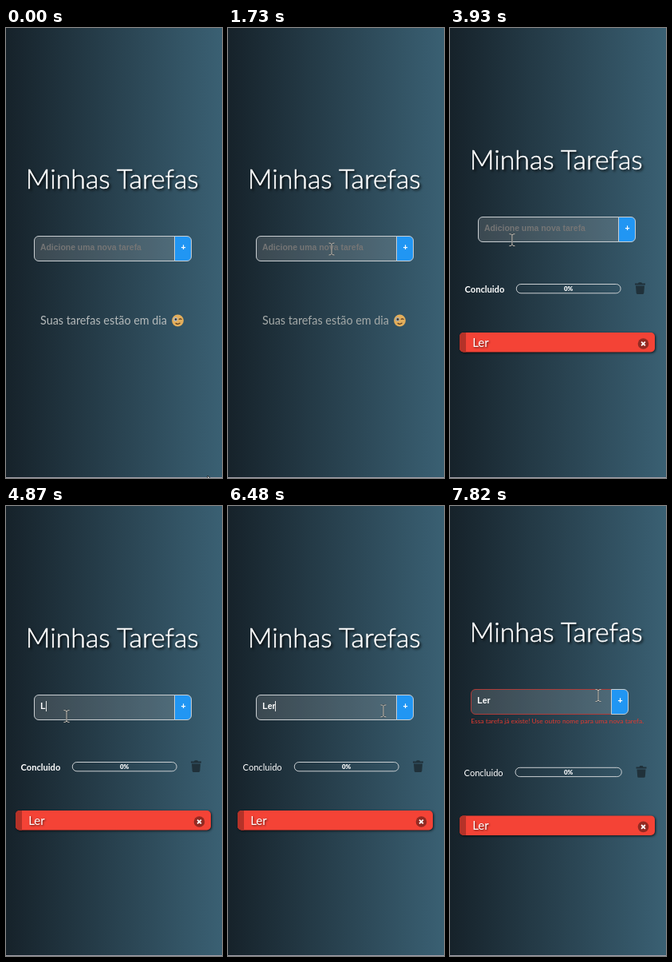
Recreate the animation shown at these times as an HTML page. Size 271x563 px, loop 8000 ms.

```html
<!DOCTYPE html>
<html lang="pt-BR">
<head>
<meta charset="utf-8">
<title>Minhas Tarefas</title>
<style>
  html, body { margin: 0; width: 100%; height: 100%; overflow: hidden; }
  body { background: linear-gradient(to right, #16222a, #3a6073); }
  svg { display: block; width: 271px; height: 563px; font-family: Lato, sans-serif; fill: #fff; }
  .mid { text-anchor: middle; }
  .line { fill: none; stroke: #c9ced1; }
  #title { font-size: 33.9px; font-weight: 300; stroke: #fff; stroke-width: .5px; filter: drop-shadow(2px 2px 1.5px rgba(0, 0, 0, .75)); }
  #empty text { font-size: 14.35px; }
  #field text { font: bold 10.45px "Liberation Sans", Arial, sans-serif; }
  #field #error { font: 8.4px Lato, sans-serif; fill: #e0392f; }
  #hint { fill: #757575; }
  #done { font-size: 11.1px; }
  #pct { font-size: 8px; font-weight: 900; }
  #bar { filter: drop-shadow(1px 1px 1.5px rgba(0, 0, 0, .75)); }
  #name { font-size: 15px; filter: drop-shadow(1px 1px 1px rgba(0, 0, 0, .6)); }
  .popup { font: 12.8px "Open Sans", "Noto Sans", sans-serif; }
  .panel { fill: #2b2b2b; filter: drop-shadow(0 3px 4px rgba(0, 0, 0, .4)); }
  #beam path { fill: none; }
</style>
</head>
<body>
<svg viewBox="0 0 271 563">
  <rect y="562" width="271" height="1" fill="#a39fa9"/>

  <text id="title" class="mid" x="133.2" y="201">Minhas Tarefas</text>

  <g id="empty">
    <text x="43" y="371">Suas tarefas estão em dia</text>
    <g transform="translate(215.5 366)">
      <circle r="7.4" fill="#e3ae5b"/>
      <circle cx="-2.8" cy="-1.6" r="2.6"/>
      <circle cx="-2.5" cy="-1.5" r="1.3" fill="#34281d"/>
      <path d="M1.4-1.4q1.8-1.6 3.6 0M-2.8 3.2q3 2.4 5.8-.4" fill="none" stroke="#50361d" stroke-width="1.2"/>
    </g>
  </g>

  <!-- local origin: top left corner of the input -->
  <g id="field">
    <path id="box" d="M176 0H5.5a5.5 5.5 0 0 0-5.5 5.5v20a5.5 5.5 0 0 0 5.5 5.5H176z" fill="#fff" fill-opacity=".14" stroke="#c9ced1"/>
    <path id="add" d="M176 0H191.5a5.5 5.5 0 0 1 5.5 5.5v20a5.5 5.5 0 0 1-5.5 5.5H176z" stroke="#c9ced1"/>
    <text class="mid" x="187" y="17.5">+</text>
    <text id="hint" x="7.4" y="17.2">Adicione uma nova tarefa</text>
    <text id="typed" x="7.8" y="17.2"></text>
    <rect id="caret" y="7.5" width="1" height="13" fill="#e6e6e6"/>
    <text id="error" x="-.2" y="42.5">Essa tarefa já existe! Use outro nome para uma nova tarefa.</text>
  </g>

  <g id="list">
    <g id="progress">
      <text id="done" x="18.6" y="331">Concluido</text>
      <rect id="track" class="line" y="320.5" height="11.3" rx="5.6"/>
      <text id="pct" class="mid" x="148.6" y="329.4">0%</text>
      <path id="bin" d="M232 319.6h4l.8-1.3h3.4l.8 1.3h4v2h-13zM233 322.6h11l-.7 9q-.1 1.3-1.4 1.3h-6.8q-1.3 0-1.4-1.3z" fill="#20313a"/>
    </g>
    <g id="task">
      <g id="bar">
        <rect x="12" y="381" width="245" height="24.5" rx="5" fill="#f44336"/>
        <path d="M20 381h-3a5 5 0 0 0-5 5v14.5a5 5 0 0 0 5 5h3z" fill="#b53228"/>
      </g>
      <text id="name" x="28.2" y="399">Ler</text>
      <circle cx="242.5" cy="395" r="6.8" fill="#922a22"/>
      <path d="M240.1 392.6l4.8 4.8m0-4.8l-4.8 4.8" stroke="#fff" stroke-width="1.8"/>
    </g>
  </g>

  <!-- suggestion panels, placed for the empty layout -->
  <g id="short" class="popup">
    <rect class="panel" x="49" y="232.5" width="164" height="35.5" rx="7"/>
    <text x="67.5" y="255.5">Lá</text>
    <text x="108.5" y="255.5">Logo</text>
    <text x="167.5" y="255.5">Legal</text>
  </g>
  <g id="long" class="popup">
    <rect class="panel" x="59.5" y="232" width="171" height="35.5" rx="7"/>
    <text x="78.5" y="255">Lerner</text>
    <text x="144.5" y="255">Lera</text>
    <rect x="200.5" y="246.5" width="15" height="11" rx="1.5" fill="#2586d0"/>
    <path d="M201.5 246q3.5-1 6.5.4q3-1.4 6.5-.4v9.5q-3.500-.8-6.500.5q-3-1.300-6.500-.5z" fill="#eef0f2"/>
  </g>

  <circle id="press" r="12" fill="#dcc81e" fill-opacity=".58"/>
  <g id="mouse">
    <path id="arrow" d="M0 0V16.4l3.8-3.6 2.5 5.7 2.6-1.1-2.5-5.6h5.3z" stroke="#20242a" stroke-width=".9"/>
    <g id="beam" transform="translate(1.500 1)">
      <path d="M-3.5-7.5q3 0 3.5 1.5q.5-1.5 3.5-1.5M0-6V6M-3.5 7.5q3 0 3.5-1.5q.5 1.5 3.5 1.5" stroke="#303538" stroke-width="2.2" stroke-opacity=".5"/>
      <path d="M-3.5-7.5q3 0 3.5 1.5q.5-1.5 3.5-1.5M0-6V6M-3.5 7.5q3 0 3.5-1.5q.5 1.5 3.5 1.5" stroke="#c8c3ba"/>
    </g>
    <path id="hand" d="M-1 1.8a1.8 1.8 0 0 1 3.6 0v6.2l6 1.3q2 .5 1.8 2.7l-.7 5-1.3 4.6h-8l-5-7.6q-.7-1.7.9-2.1 1.2 0 2.7 1.7z" stroke="#20242a" stroke-width=".9"/>
  </g>
</svg>
<script>
const LOOP = 8000, ADDED = 3190, FAILED = 7160;
const $ = id => document.getElementById(id);
const show = (id, on) => $(id).setAttribute('display', on ? 'inline' : 'none');
const move = (id, x, y) => $(id).setAttribute('transform', `translate(${x} ${y})`);
const set = (id, name, value) => $(id).setAttribute(name, value);

// Value of the last entry [time, value] already reached
const at = (list, t) => list.reduce((v, [start, next]) => t >= start ? next : v, list[0][1]);

const typing = [[0, ''], [1930, 'L'], [2230, 'Le'], [2300, 'Ler'], [ADDED, ''],
  [4870, 'L'], [5270, 'Le'], [5340, 'Ler']];
const panels = [[0, ''], [2070, 'short'], [2510, 'long'], [ADDED, ''],
  [5070, 'short'], [5540, 'long'], [6480, '']];
const carets = [[0, 0], [1190, 1], [1730, 0], [1930, 1], [2910, 0], [ADDED, 1], [3690, 0],
  [4130, 1], [4470, 0], [4870, 1], [5870, 0], [6370, 1], [6870, 0]];
const presses = [[0, 0], [1190, 1], [1330, 0], [4130, 1], [4200, 0], [7020, 1], [FAILED, 0]];
const caretX = { '': 7.5, L: 14.5, Le: 19.5, Ler: 23.5 };

// Pointer strokes: start, end, number of steps, then from, bend and to
const strokes = [
  [70, 840, 12, [253, 560], [182, 350], [137, 282]],
  [910, 1190, 5, [137, 282], [131, 277], [128.5, 275.5]],
  [3390, 4130, 9, [128.5, 275.5], [100, 292], [74.5, 262]],
  [6200, 6950, 11, [74.5, 262], [160, 262], [231, 250]],
  [7620, 7820, 4, [231, 250], [210, 248], [184.5, 236]]
];

function pointer(t) {
  let pos = strokes[0][3];
  for (const [start, end, steps, a, b, c] of strokes) {
    if (t < start) break;
    const k = Math.floor((t - start) / (end - start) * (steps - 1)) + 1;
    const p = Math.min(1, k / steps);
    const e = 1 - (1 - p) ** 3;
    pos = a.map((v, i) => (1 - e) ** 2 * v + 2 * e * (1 - e) * b[i] + e * e * c[i]);
  }
  return pos;
}

function draw(t) {
  const added = t >= ADDED, failed = t >= FAILED;
  const rise = failed ? -31 : added ? -24 : 0;
  const left = failed ? 27 : 36, top = 261 + rise;
  const text = at(typing, t), panel = at(panels, t);

  move('title', 0, rise);
  move('field', left - .5, top - .5);
  show('empty', !added);
  set('empty', 'fill', t < 910 ? '#b5babb' : '#a5aaa9');
  show('list', added);
  show('error', failed);
  set('box', 'stroke', failed ? '#ae3c39' : '#c9ced1');

  move('progress', 0, failed ? 6.8 : 0);
  move('task', 0, failed ? 6.4 : 0);
  move('done', failed ? -1 : 0, 0);
  move('bin', failed ? 1.5 : 0, 0);
  set('done', 'font-weight', t < 6480 ? 700 : 400);
  set('track', 'x', failed ? 82 : 83.3);
  set('track', 'width', failed ? 133.3 : 130.8);

  show('hint', !text);
  $('typed').textContent = text;
  show('caret', at(carets, t));
  set('caret', 'x', caretX[text]);
  for (const id of ['short', 'long']) {
    show(id, panel === id);
    move(id, 0, rise);
  }

  const [x, y] = pointer(t);
  const inRow = y > top && y < top + 31;
  const onAdd = inRow && x > left + 176 && x < left + 197;
  const onBox = inRow && x > left && x <= left + 176 && !panel;
  set('add', 'fill', onAdd ? '#0b7dda' : '#2196f3');
  show('hand', onAdd);
  show('beam', onBox);
  show('arrow', !onAdd && !onBox);
  move('mouse', x, y);
  show('press', at(presses, t));
  move('press', x - (onAdd ? 1 : 0), y);
}

function tick() {
  draw(performance.now() % LOOP);
  requestAnimationFrame(tick);
}
tick();
</script>
</body>
</html>
```
